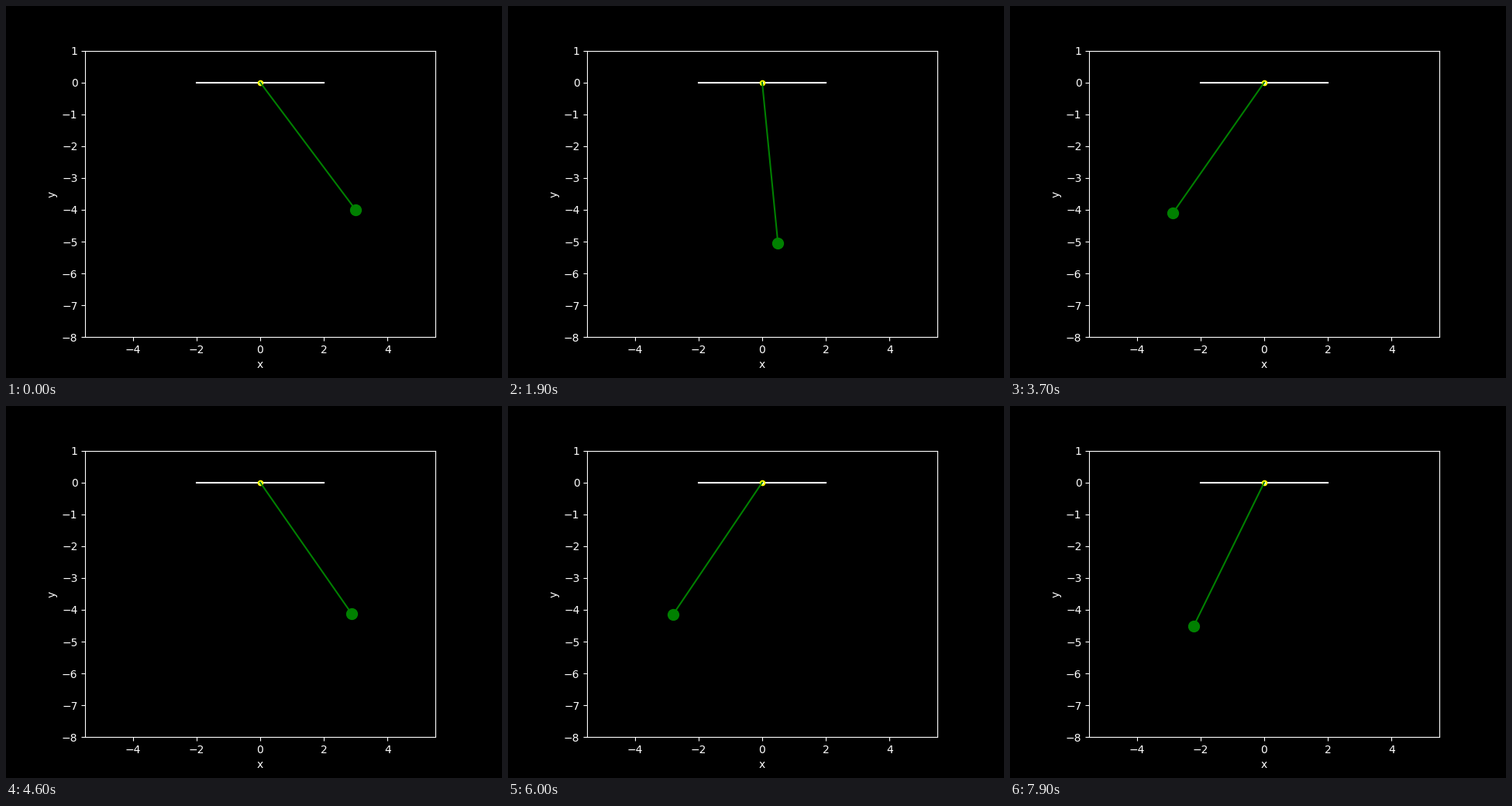
Write a matplotlib script that moves like this. It is 640x480 px and loops after 8 s.

```python
import numpy as np
import matplotlib.pyplot as plt
from matplotlib.animation import FuncAnimation

FRAMES = 80
INTERVAL = 100    # ms
PERIOD = 23.0     # frames per swing
LEAD = 4.54       # frames since the bob last passed the lowest point

plt.style.use("dark_background")
fig, ax = plt.subplots(figsize=(6.4, 4.8), dpi=100)
ax.set_aspect("equal")
ax.set_xlim(-5.5, 5.5)
ax.set_ylim(-8, 1)
ax.set_xticks(range(-4, 5, 2))
ax.set_yticks(range(-8, 2))
ax.set_xlabel("x")
ax.set_ylabel("y")

ax.plot([-2, 2], [0, 0], color="white", lw=1.5)
ax.plot(0, 0, "o", ms=4, mfc="white", mec="yellow", mew=1.5)
rod, = ax.plot([], [], color="green", lw=1.5)
bob, = ax.plot([], [], "o", color="green", ms=10)


def bob_position(n):
    """Damped swing on a rod that stretches a little at the bottom."""
    phase = 2 * np.pi * (n + LEAD) / PERIOD
    angle = 0.68 * np.exp(-0.0012 * n) * np.sin(phase)
    length = 5.005 + 0.07 * np.cos(phase) ** 2
    return length * np.sin(angle), -length * np.cos(angle)


def update(n):
    x, y = bob_position(n)
    rod.set_data([0, x], [0, y])
    bob.set_data([x], [y])
    return rod, bob


anim = FuncAnimation(fig, update, frames=FRAMES, interval=INTERVAL,
                     repeat=True, repeat_delay=0)
plt.show()
```
